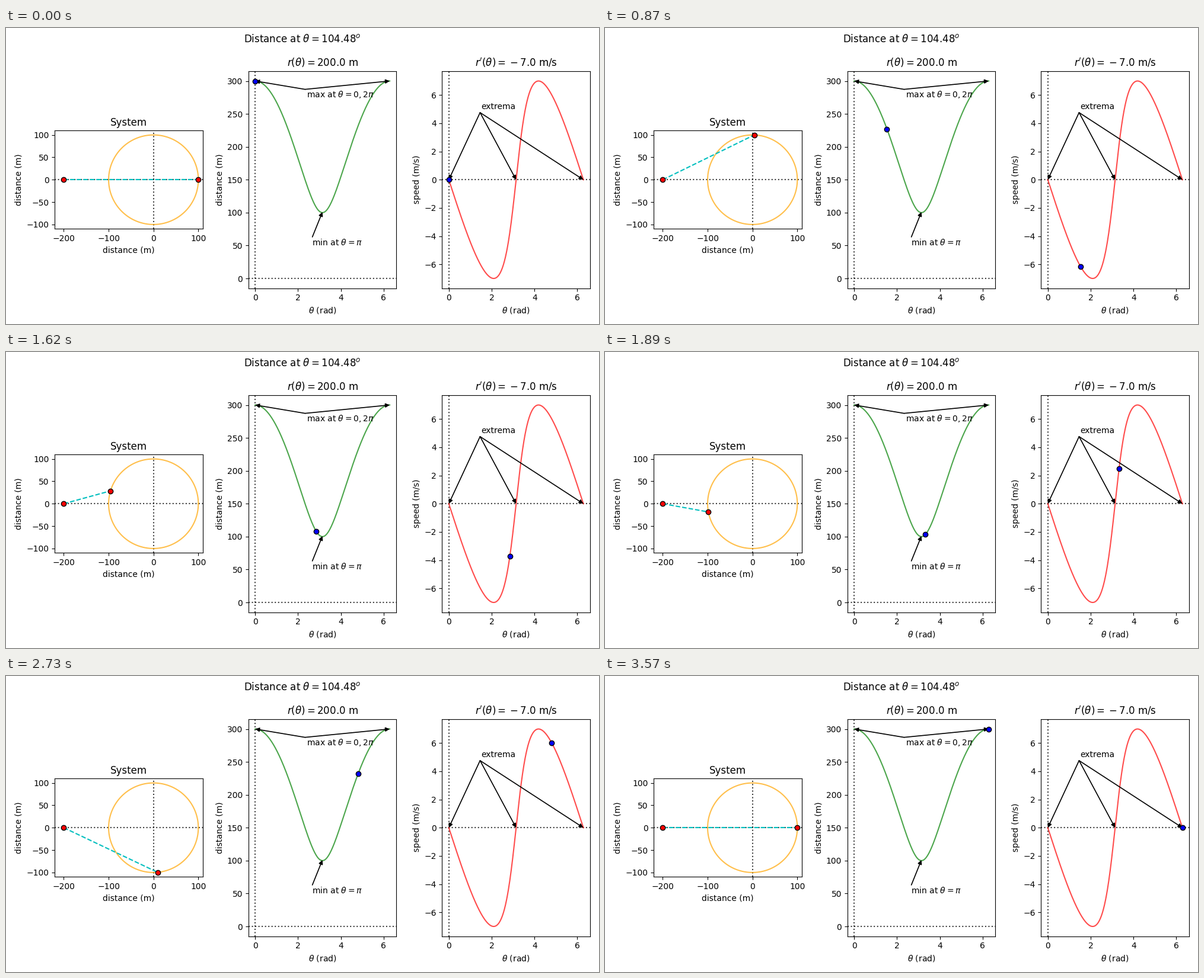
Animation of 1000x500 px, one loop 3.6 s. Source, as a matplotlib script:

```python
import matplotlib.pyplot as plt
import numpy as np
from matplotlib.animation import FuncAnimation

FRAMES, INTERVAL = 120, 30
RADIUS, OBSERVER, SPEED = 100, 200, 7

plt.rcParams["font.family"] = "DejaVu Sans"


def distance(t):
    return np.sqrt(RADIUS**2 + OBSERVER**2 + 2 * RADIUS * OBSERVER * np.cos(t))


def rate(t):
    return -SPEED * OBSERVER * np.sin(t) / distance(t)


def add_guides(ax):
    ax.axhline(0, color="k", ls=":", alpha=0.75)
    ax.axvline(0, color="k", ls=":", alpha=0.75)


def add_arrows(ax, start, *tips):
    for tip in tips:
        ax.annotate("", xy=tip, xytext=start, zorder=3,
                    arrowprops=dict(arrowstyle="-|>", color="k", lw=1.2,
                                    shrinkA=0, shrinkB=0))


def add_dot(ax, color):
    return ax.plot([], [], "o", color=color, mec="k", zorder=4)[0]


fig, (system, dist, speed) = plt.subplots(1, 3, figsize=(10, 5), dpi=100)
fig.suptitle(r"Distance at $\theta = 104.48^o$")
theta = np.linspace(0, 2 * np.pi, 400)

add_guides(system)
system.plot(RADIUS * np.cos(theta), RADIUS * np.sin(theta),
            color="orange", alpha=0.7)
system.set(title="System", xlabel="distance (m)", ylabel="distance (m)",
           xlim=(-220, 110), ylim=(-110, 110), aspect="equal")

add_guides(dist)
dist.plot(theta, distance(theta), "g", alpha=0.7)
dist.set(title=r"$r(\theta) = 200.0$ m", xlabel=r"$\theta$ (rad)",
         ylabel="distance (m)")
dist.text(2.4, 275, r"max at $\theta=0,2\pi$")
dist.text(np.pi - 0.5, 50, r"min at $\theta=\pi$")
add_arrows(dist, (2.33, 287.3), (0, 300), (2 * np.pi, 300))
add_arrows(dist, (2.67, 63), (np.pi, 101))

add_guides(speed)
speed.plot(theta, rate(theta), "r", alpha=0.7)
speed.set(title=r"$r'(\theta) = -7.0$ m/s", xlabel=r"$\theta$ (rad)",
          ylabel="speed (m/s)")
speed.text(1.5, 5, "extrema")
add_arrows(speed, (1.46, 4.76), (0, 0), (np.pi, 0), (2 * np.pi, 0))

fig.tight_layout()

sight, = system.plot([], [], "c--", zorder=3)
ends = add_dot(system, "r")
dist_dot = add_dot(dist, "b")
speed_dot = add_dot(speed, "b")


def update(i):
    t = 2 * np.pi * i / (FRAMES - 1)
    xs, ys = [-OBSERVER, RADIUS * np.cos(t)], [0, RADIUS * np.sin(t)]
    sight.set_data(xs, ys)
    ends.set_data(xs, ys)
    dist_dot.set_data([t], [distance(t)])
    speed_dot.set_data([t], [rate(t)])
    return sight, ends, dist_dot, speed_dot


anim = FuncAnimation(fig, update, frames=FRAMES, interval=INTERVAL,
                     init_func=lambda: update(0), repeat=True, repeat_delay=0)
plt.show()
```
